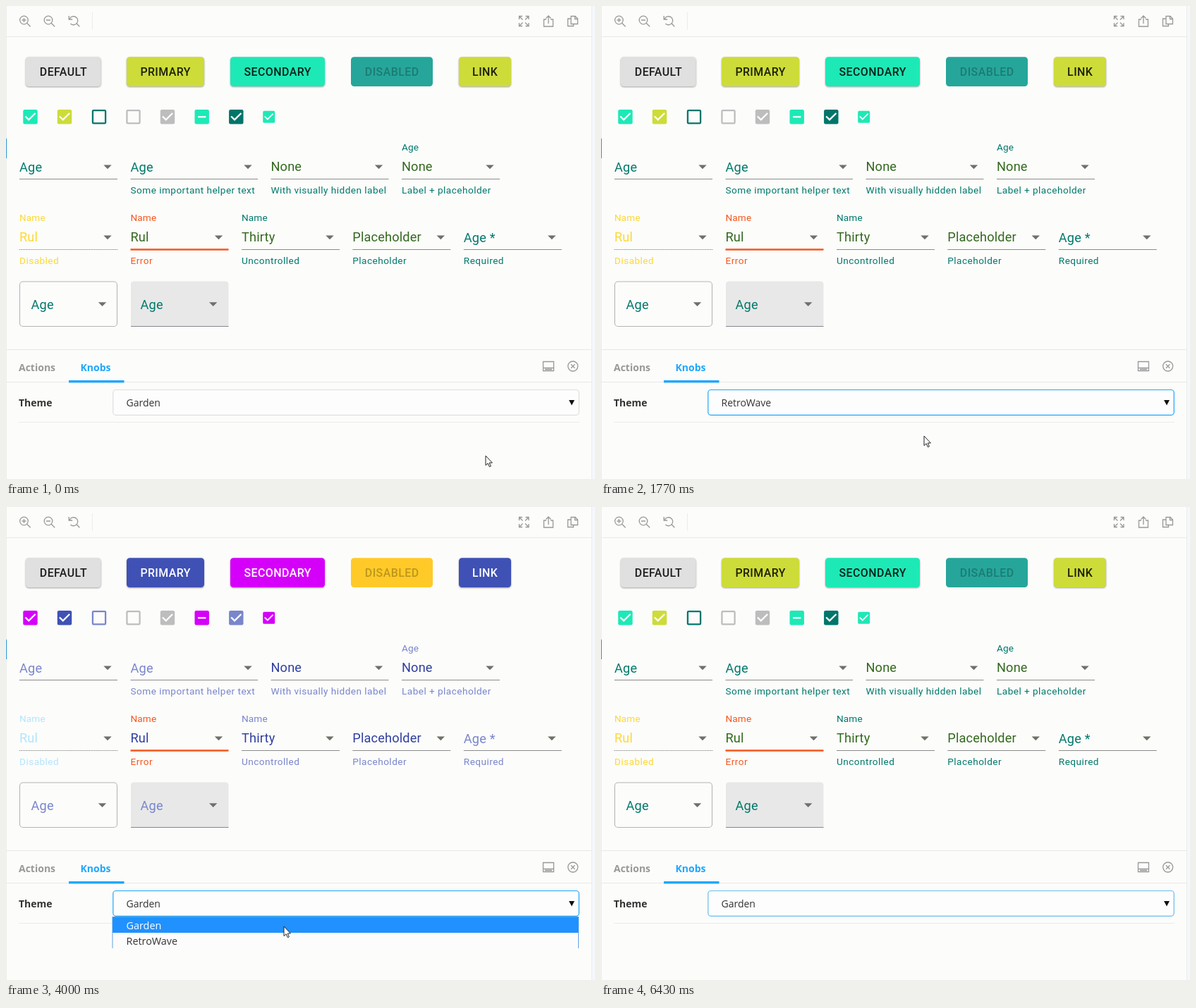
An HTML page for the animation above (6460 ms loop, 835 by 671 pixels).

```html
<!DOCTYPE html>
<html lang="en">
<head>
<meta charset="utf-8">
<title>Theme knobs</title>
<style>
  html, body { margin: 0; width: 100%; height: 100%; overflow: hidden; background: #fcfcfb; }
  svg { display: block; width: 835px; height: 671px; }
  text { font: 14px "Open Sans", "Noto Sans", sans-serif; fill: #333; white-space: pre; }
  .bold { font-weight: 700; }
  .option { font-size: 14.4px; }
  .button { font: 500 15.9px Roboto, sans-serif; letter-spacing: .02857em; text-anchor: middle; }
  .value { font: 18.16px Roboto, sans-serif; letter-spacing: .00938em; }
  .small { font: 13.62px Roboto, sans-serif; letter-spacing: .00938em; }
  .help { font: 13.62px Roboto, sans-serif; letter-spacing: .03333em; }
  .raised { filter: drop-shadow(0 1.5px 1.3px rgba(0, 0, 0, .36)); }
  .icon { fill: none; stroke: #999; stroke-width: 1.3; }
</style>
</head>
<body>
<svg id="stage" viewBox="0 0 835 671"></svg>
<script>
const LOOP = 6460, TO_RETRO = 2000, TO_GARDEN = 4360;
const stage = document.getElementById('stage');

function add(tag, attrs, parent = stage) {
  const el = document.createElementNS('http://www.w3.org/2000/svg', tag);
  for (const key in attrs) el.setAttribute(key, attrs[key]);
  return parent.appendChild(el);
}
function rect(x, y, width, height, style = '', rx = 0, parent = stage) {
  return add('rect', { x, y, width, height, rx, style }, parent);
}
function path(d, style = '', cls = '', parent = stage) {
  return add('path', { d, style, class: cls }, parent);
}
function label(x, y, words, cls, fill = '', parent = stage) {
  const el = add('text', { x, y, class: cls, style: fill && `fill:${fill}` }, parent);
  el.textContent = words;
  return el;
}

// Frame of the page
rect(830, 0, 5, 671, 'fill:#f5f8fb');
rect(830, 0, 1, 671, 'fill:#e8ebee');
rect(0, 0, 1, 671, 'fill:#ececec');
rect(0, 188, 1, 28, 'fill:#2c95d4');
for (const y of [43, 487, 533]) rect(1, y, 829, 1, 'fill:#e8e8e6');
rect(18, 590, 795, 1, 'fill:#ebebe9');
rect(122, 9, 1, 25, 'fill:#ececea');

// Toolbar
for (const x of [25.5, 60]) {
  add('circle', { cx: x, cy: 20, r: 5.8, class: 'icon' });
  path(`M${x + 4.2} 24.2l5 5M${x - 3} 20h6${x < 30 ? `M${x} 17v6` : ''}`, '', 'icon');
}
path('M90.3 18.2A6 6 0 1 1 91.5 25M89.2 14v5h5M99.6 24.3l4.7 4.9', '', 'icon');
path('M727.5 19v-4.5h4.5M736.5 14.5h4.5v4.5M741 24v4.5h-4.5M732 28.5h-4.5v-4.5' +
  'M728 15l4.5 4.5M740.5 15l-4.5 4.5M740.5 28l-4.5-4.5M728 28l4.5-4.5', '', 'icon');
path('M766 19h-3.500v10h13v-10h-3.500M769 25v-10.500M765.500 17.500l3.500-3.500 3.500 3.500', '', 'icon');
path('M801 18h-4.500v10.500h8v-3M801 14.500h6l3.500 3.500v7.500h-9.500zM806.500 14.500v4h4', '', 'icon');

// Buttons
[
  [28, 106.5, 'DEFAULT', '#e0e0e0', '#1d1d1d'],
  [171, 110, 'PRIMARY', 'var(--primary)', 'var(--onPrimary)'],
  [318, 134, 'SECONDARY', 'var(--secondary)', 'var(--onSecondary)'],
  [489, 116, 'DISABLED', 'var(--disabled)', 'rgba(0,0,0,.26)'],
  [642, 74, 'LINK', 'var(--primary)', 'var(--onPrimary)'],
].forEach(([x, w, words, fill, ink]) => {
  const box = rect(x, 72.3, w, 41.8, `fill:${fill}`, 4.5);
  if (words !== 'DISABLED') box.setAttribute('class', 'raised');
  label(x + w / 2 + .2, 99.3, words, 'button', ink);
});

// Checkboxes
[
  [34.5, 'check', '--accent'], [83, 'check', '--main'], [132, 'empty', '--dark'],
  [180.5, 'empty'], [229, 'check'], [277.7, 'dash', '--accent'],
  [326.3, 'check', '--dark'], [372.7, 'check', '--accent', .83],
].forEach(([x, kind, name, size = 1]) => {
  const color = name ? `var(${name})` : '#bdbdbd';
  const g = add('g', { transform: `translate(${x} 157.3) scale(${1.135 * size})` });
  if (kind === 'empty') {
    rect(-8, -8, 16, 16, `fill:none;stroke:${color};stroke-width:2`, 1, g);
  } else {
    rect(-9, -9, 18, 18, `fill:${color}`, 2, g);
    path(kind === 'dash' ? 'M-5 0h10' : 'M-6.300 -.700l4.300 4.300 8.300-8.300',
      'fill:none;stroke:#fcfcfb;stroke-width:2', '', g);
  }
});

// Select fields
function arrow(x, y) {
  path(`M${x - 5.7} ${y}h11.400l-5.700 5.700z`, 'fill:#6f7069');
}
function field(x, w, y, { top, value, placeholder, help, tint = '--label', ink = '--value', line = 'plain' }) {
  if (top) label(x, y - 41, top, 'small', `var(${tint})`);
  if (value) label(x, y - 11.3, value, 'value', `var(${ink})`);
  else label(x, y - 10.8, placeholder, 'value', `var(${tint})`);
  if (help) label(x, y + 20.3, help, 'help', `var(${tint})`);
  arrow(x + w - 14, y - 20);
  const look = {
    plain: '#8b8b8b;stroke-width:1',
    dotted: '#777;stroke-width:1;stroke-dasharray:1.2 1.1',
    error: 'var(--error);stroke-width:2.3',
  }[line];
  path(`M${x} ${y}h${w}`, `stroke:${look}`);
}
field(19, 139, 245.5, { placeholder: 'Age' });
field(176.5, 180.5, 245.5, { placeholder: 'Age', help: 'Some important helper text' });
field(375.5, 167, 245.5, { value: 'None', help: 'With visually hidden label' });
field(561, 139, 245.5, { top: 'Age', value: 'None', help: 'Label + placeholder' });
field(19, 139, 345.5, { top: 'Name', value: 'Rul', help: 'Disabled', tint: '--faint', ink: '--faint', line: 'dotted' });
field(176.5, 139, 345.5, { top: 'Name', value: 'Rul', help: 'Error', tint: '--error', line: 'error' });
field(334, 139, 345.5, { top: 'Name', value: 'Thirty', help: 'Uncontrolled' });
field(491.3, 139, 345.5, { value: 'Placeholder', help: 'Placeholder' });
field(648.8, 139, 345.5, { placeholder: 'Age *', help: 'Required' });

rect(19.5, 391, 138, 63.5, 'fill:none;stroke:#b5b5b5;stroke-width:1.1', 4.5);
label(35.5, 430, 'Age', 'value', 'var(--label)');
arrow(136.5, 420.3);
path('M177 455v-60q0-4.500 4.500-4.500h129.500q4.500 0 4.500 4.500v60z', 'fill:#e8e8e8');
rect(177, 454, 138.500, 1, 'fill:#85858f');
label(190.5, 430, 'Age', 'value', 'var(--label)');
arrow(293.7, 420.3);

// Knobs panel
label(18, 517.5, 'Actions', 'bold', '#999');
label(105.5, 517.5, 'Knobs', 'bold', '#1ea7fd');
rect(89, 531, 78.5, 3.4, 'fill:#1ea7fd');
path('M761.500 504.500h15v13h-15zM761.500 513.500h15M764 515.500h10', '', 'icon');
add('circle', { cx: 803.7, cy: 511, r: 7, class: 'icon' });
path('M801 508.300l5.400 5.400m0-5.400l-5.400 5.400', '', 'icon');
label(18, 568, 'Theme', 'bold');
const border = rect(151.8, 544.5, 660.5, 35.8, 'fill:#fdfdfd;stroke-width:1.2', 4);
const chosen = label(170.5, 568, '', '');
path('M798 559h8l-4 7.500z', 'fill:#111');

const popup = add('g', {});
rect(150.5, 581, 661.5, 45, 'fill:#5f9fe0', 0, popup);
rect(151.5, 582, 659.5, 44, 'fill:#fdfdfd', 0, popup);
const bar = rect(151, 582, 660.5, 22, 'fill:#1e90ff', 0, popup);
const options = ['Garden', 'RetroWave'].map((name, i) => label(170.5, 599 + 21.7 * i, name, 'option', '#333', popup));

const cursor = path('M0 0V13.600l3.100-2.900 2.300 5 2-.900-2.200-4.800h4.200z',
  'fill:#fff;stroke:#222;stroke-width:1;stroke-linejoin:round');

// Motion
const clamp = v => Math.min(1, Math.max(0, v));
function bezier(x1, y1, x2, y2) {
  const curve = (a, b, s) => 3 * a * s * (1 - s) ** 2 + 3 * b * s * s * (1 - s) + s ** 3;
  return x => {
    if (x <= 0 || x >= 1) return clamp(x);
    let low = 0, high = 1;
    for (let i = 0; i < 20; i++) {
      const mid = (low + high) / 2;
      if (curve(x1, x2, mid) < x) low = mid; else high = mid;
    }
    return curve(y1, y2, low);
  };
}
const standard = bezier(.4, 0, .2, 1), decelerate = bezier(0, 0, .2, 1), easeOut = bezier(0, 0, .58, 1);

function mix(a, b, p) {
  const channels = c => [1, 3, 5].map(i => parseInt(c.slice(i, i + 2), 16));
  const end = channels(b);
  return `rgb(${channels(a).map((v, i) => Math.round(v + (end[i] - v) * p))})`;
}

// Name, Garden colour, RetroWave colour, duration, easing
const colors = [
  ['primary', '#cddc39', '#3f51b5', 250, standard],
  ['secondary', '#1de9b6', '#d500f9', 250, standard],
  ['disabled', '#26a69a', '#ffca28', 250, standard],
  ['label', '#00796b', '#7986cb', 200, decelerate],
  ['faint', '#fdd835', '#b3e5fc', 200, decelerate],
  ['error', '#f4581e', '#f4581e', 1, clamp],
  ['onPrimary', '#1d2008', '#ffffff', 1, clamp],
  ['onSecondary', '#0a2019', '#ffffff', 1, clamp],
  ['value', '#33691e', '#303f9f', 1, clamp],
  ['accent', '#1de9b6', '#d500f9', 1, clamp],
  ['main', '#cddc39', '#3f51b5', 1, clamp],
  ['dark', '#00756a', '#7986cb', 1, clamp],
];

// Time, x, y of the pointer tip
const route = [
  [0, 680, 638], [30, 680, 638], [530, 480, 568], [700, 480, 568], [1330, 464, 600], [1470, 458, 610],
  [2500, 458, 610], [2870, 420, 558], [3300, 420, 558], [3700, 404, 584], [3800, 394, 595],
  [5170, 394, 595], [5600, 84, 674], [LOOP, 84, 674],
];

function draw(t) {
  for (const [name, garden, retro, span, ease] of colors) {
    const p = ease((t - TO_RETRO) / span) - ease((t - TO_GARDEN) / span);
    stage.style.setProperty('--' + name, mix(garden, retro, p));
  }

  const focus = easeOut((t - 670) / 200) - easeOut((t - 6380) / 200);
  border.style.stroke = mix('#dededc', '#1ea7fd', focus);
  chosen.textContent = t >= 1630 && t < 4000 ? 'RetroWave' : 'Garden';

  const fade = t < 2500 ? (t >= 700) - clamp((t - 1630) / 120) : (t >= 3030) - clamp((t - 4000) / 100);
  popup.setAttribute('opacity', Math.max(0, fade));
  const active = t >= 1370 && t < 3700 ? 1 : 0;
  bar.setAttribute('y', 582 + 22 * active);
  options.forEach((el, i) => { el.style.fill = i === active ? '#fff' : '#333'; });

  const next = route.findIndex(k => k[0] > t);
  const [t0, x0, y0] = route[next - 1], [t1, x1, y1] = route[next];
  const p = (t - t0) / (t1 - t0);
  cursor.setAttribute('transform', `translate(${x0 + (x1 - x0) * p} ${y0 + (y1 - y0) * p})`);
}

const start = performance.now();
function tick() {
  draw((performance.now() - start) % LOOP);
  requestAnimationFrame(tick);
}
tick();
</script>
</body>
</html>
```
